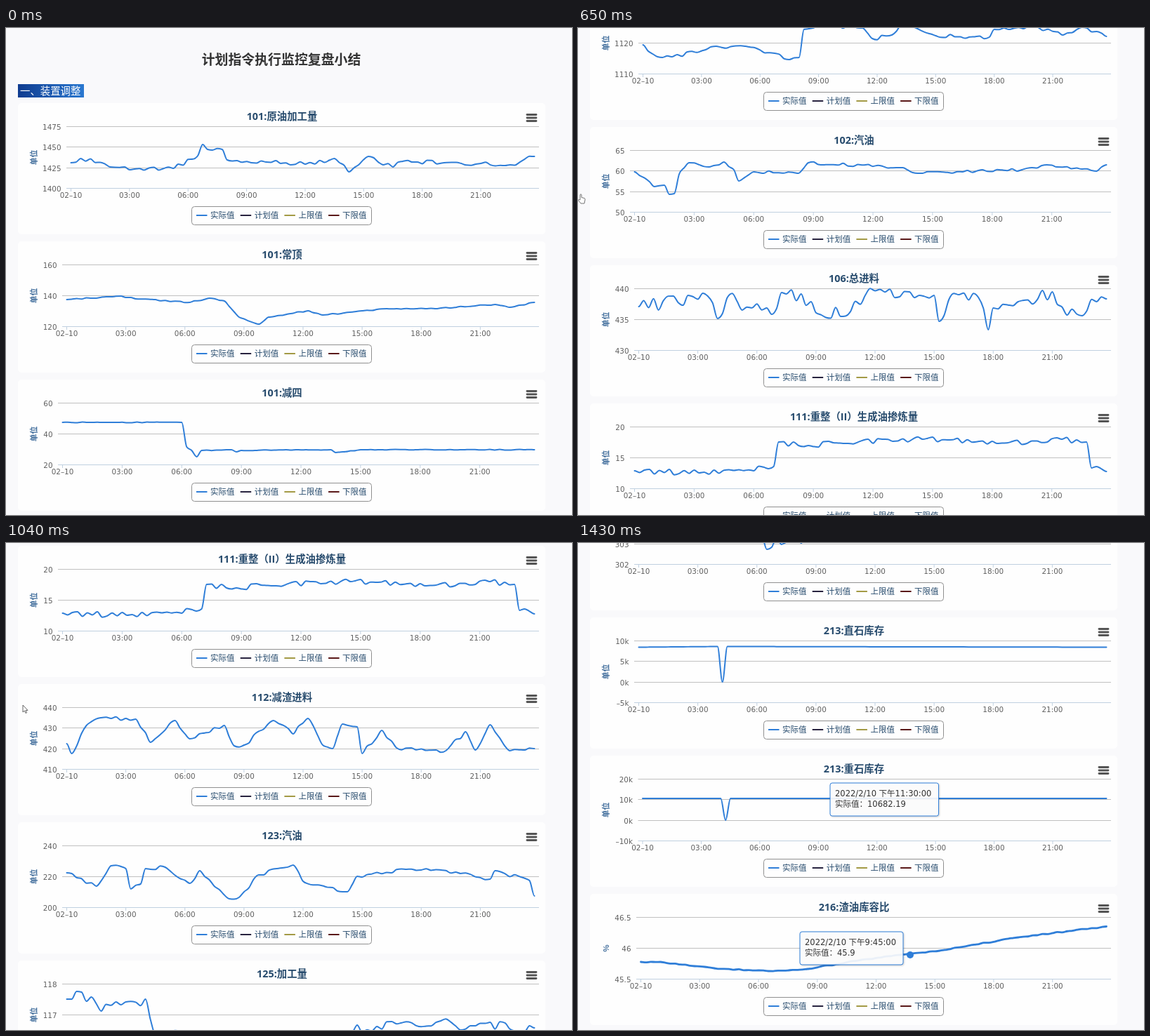
Recreate the animation shown at these times as an HTML page. Size 806x694 px, loop 1560 ms.

```html
<!DOCTYPE html>
<html lang="zh-CN">
<head>
<meta charset="utf-8">
<style>
html, body { margin: 0; width: 100%; height: 100%; overflow: hidden; background: #f9f9fb; }
svg { display: block; width: 806px; height: 694px; }
text { font: 10.4px "DejaVu Sans", "Noto Sans CJK SC", "Noto Sans CJK", sans-serif; fill: #606060; }
.mid { text-anchor: middle; }
.end { text-anchor: end; }
.head { font: bold 18.9px "Noto Sans CJK SC", "Noto Sans CJK", sans-serif; fill: #333; }
.badge { font: 500 14.4px "Noto Sans CJK SC", "Noto Sans CJK", sans-serif; fill: #fff; }
.title { font: bold 14.4px "Open Sans", "Noto Sans CJK SC", "Noto Sans CJK", sans-serif; fill: #274b6d; }
.unit { font: bold 10.8px "Noto Sans CJK SC", "Noto Sans CJK", sans-serif; fill: #3f6c9b; }
.key { font-size: 11.5px; fill: #274b6d; }
.tip text { font-size: 11.5px; fill: #333; }
.tip rect { fill: #fff; fill-opacity: .9; stroke: #2f7ed8; filter: drop-shadow(1px 1px 1px #0003); }
.panel { fill: #fefefe; }
.grid { stroke: #c0c0c0; }
.axis { stroke: #c0d0e0; }
.box { fill: #fefefe; stroke: #909090; }
.line { fill: none; stroke: #2f7ed8; stroke-width: 2; stroke-linejoin: round; stroke-linecap: round; }
.bold { stroke-width: 2.8; }
.menu { stroke: #555; stroke-width: 2.8; stroke-linecap: round; }

#page, #arrow, #hand { animation: scroll 1560ms step-end infinite; }
#arrow { animation-name: arrow; }
#hand { animation-name: hand; }
@keyframes scroll {
  0% { transform: translateY(0); }
  8.333% { transform: translateY(-137px); }
  16.666% { transform: translateY(-273px); }
  24.999% { transform: translateY(-410px); }
  33.333% { transform: translateY(-582px); }
  41.666% { transform: translateY(-754px); }
  49.999% { transform: translateY(-962px); }
  58.333% { transform: translateY(-1169px); }
  66.666% { transform: translateY(-1285px); }
  74.999% { transform: translateY(-1412px); }
  83.333% { transform: translateY(-1538px); }
  91.666%, 100% { transform: translateY(-2365px); }
}
@keyframes arrow {
  0% { transform: translate(4px, 236px); opacity: 0; }
  8.333% { transform: translate(4px, 236px); opacity: 1; }
  41.666% { transform: translate(4px, 236px); opacity: 0; }
  49.999% { transform: translate(24px, 231px); opacity: 1; }
  91.666%, 100% { transform: translate(24px, 231px); opacity: 0; }
}
@keyframes hand {
  0% { opacity: 0; }
  41.666% { opacity: 1; }
  49.999%, 100% { opacity: 0; }
}
</style>
</head>
<body>
<svg viewBox="0 0 806 694">
  <defs>
    <linearGradient id="blue"><stop stop-color="#0f3c90"/><stop offset="1" stop-color="#2a78d0"/></linearGradient>
  </defs>
  <g id="page">
    <text class="head mid" x="392" y="52">计划指令执行监控复盘小结</text>
    <rect x="17" y="80" width="94" height="19" fill="url(#blue)"/>
    <text class="badge" x="20" y="95">一、装置调整</text>
  </g>
  <path id="arrow" d="M0 0V10L2.4 8L4 11.5L5.6 10.8L4 7.4H7Z" fill="#fff" stroke="#555" stroke-width=".9"/>
  <path id="hand" d="M3 244V237.500Q4 236 5 237.500V241.500L9 242.500Q10.500 243 10 245L9 250H4L.5 245.500Q.5 243.500 3 245Z" fill="#fff" stroke="#666" stroke-width=".9"/>
</svg>
<script>
const page = document.getElementById('page');
const RIGHT = 759, LAST = 752.5, PITCH = 197, HEIGHT = 88.5, SLOTS = 96;
const KEYS = [['实际值', '#2f7ed8'], ['计划值', '#28233f'], ['上限值', '#a39a45'], ['下限值', '#5a1818']];
let count = 0;

const text = (cls, x, y, s) => `<text class="${cls}" x="${x}" y="${y}">${s}</text>`;
const rule = (cls, x1, y1, x2, y2) => `<path class="${cls}" d="M${x1} ${y1}L${x2} ${y2}"/>`;

function random(seed) {
  let s = seed * 7919 + 17;
  return () => (s = (s * 16807) % 2147483647) / 2147483647;
}

// Quarter-hour heights: straight runs between slot,height turning points,
// with seeded jitter on the slots in between
function trend(jitter, keys) {
  const rnd = random(count + 1), out = [];
  for (let i = 0, k = 0; i < SLOTS; i++) {
    while (i > keys[k + 2]) k += 2;
    const [x1, y1, x2, y2] = keys.slice(k, k + 4);
    const noise = (rnd() * 2 - 1) * jitter;
    out.push(y1 + (y2 - y1) * (i - x1) / (x2 - x1) + (i === x1 || i === x2 ? 0 : noise));
  }
  return out;
}

// Smooth curve that stays level at peaks and dips
function spline(ys, x0) {
  const dx = (LAST - x0) / (ys.length - 1);
  const slope = ys.map((y, i) => {
    const a = y - ys[i - 1], b = ys[i + 1] - y;
    if (!(a * b > 0)) return 0;
    return Math.sign(a) * Math.min(Math.abs(a + b) / 2, 2 * Math.abs(a), 2 * Math.abs(b));
  });
  let d = `M${x0} ${ys[0]}`;
  for (let i = 1; i < ys.length; i++) {
    const x = x0 + dx * i;
    d += `C${x - dx * 2 / 3} ${ys[i - 1] + slope[i - 1] / 3} ${x - dx / 3} ${ys[i] - slope[i] / 3} ${x} ${ys[i]}`;
  }
  return d;
}

function tip(x, y, w, time, value) {
  return `<g class="tip"><rect x="${x}" y="${y}" width="${w}" height="47" rx="3"/>` +
    text('', x + 7, y + 19, time) + text('', x + 7, y + 34, '实际值：' + value) + '</g>';
}

function chart(title, left, labels, jitter, keys, { unit = '单位', bold = '', extra = '' } = {}) {
  const x0 = left + 6.5, hours = (LAST - x0) / (SLOTS - 1) * 12;
  let s = `<rect class="panel" x="17" y="-33" width="751" height="187" rx="5"/>`;
  s += text('title mid', 393, -9, title);
  for (const y of [-16.5, -12, -7.5]) s += rule('menu', 742, y, 755, y);
  labels.forEach((label, i) => {
    const y = Math.floor(HEIGHT * i / (labels.length - 1)) + .5;
    s += rule(i < labels.length - 1 ? 'grid' : 'axis', left, y, RIGHT, y);
    s += text('end', left - 7.5, y + 4, label);
  });
  for (let i = 0; i < 8; i++) {
    const x = x0 + hours * i;
    s += rule('axis', x, 89, x, 93);
    s += text('mid', x, 102, i ? String(i * 3).padStart(2, 0) + ':00' : '02–10');
  }
  s += `<g transform="translate(44 44.500) rotate(-90)">${text('unit mid', 0, 0, unit)}</g>`;
  s += `<path class="line ${bold}" d="${spline(trend(jitter, keys), x0)}"/>`;
  s += `<rect class="box" x="264.500" y="114.500" width="256" height="26" rx="4"/>`;
  KEYS.forEach(([name, color], i) => {
    const x = 271 + 62.7 * i;
    s += `<path d="M${x} 127h15.500" stroke="${color}" stroke-width="2"/>` + text('key', x + 20, 131, name);
  });
  page.insertAdjacentHTML('beforeend', `<g transform="translate(0 ${140 + PITCH * count++})">${s}${extra}</g>`);
}

chart('101:原油加工量', 86, [1475, 1450, 1425, 1400], 3,
  [0,52, 2,46, 12,62, 21,60, 26,42, 27,26, 28,33, 31,33, 32,48, 48,54, 54,46, 57,65, 61,43, 66,58, 68,50, 90,55, 95,43]);
chart('101:常顶', 80, [160, 140, 120], .8,
  [0,50, 11,45, 14,49, 25,54, 29,48, 32,52, 35,75, 39,85, 41,75, 49,66, 52,72, 65,63, 75,63, 87,57, 90,61, 95,54]);
chart('101:减四', 74, [60, 40, 20], .5,
  [0,28, 24,28, 25,63, 26,68, 27,77, 28,68, 34,67, 35,70, 36,68, 54,67, 55,71, 60,67, 95,67]);
chart('121:原油', 86, [1130, 1120, 1110], 3,
  [0,47, 2,60, 6,64, 15,49, 21,49, 27,59, 30,68, 32,65, 33,25, 37,18, 45,23, 47,38, 51,33, 53,18, 60,34, 71,36, 72,25, 81,22, 86,33, 90,22, 95,35]);
chart('102:汽油', 74, [65, 60, 55, 50], 2,
  [0,31, 4,52, 6,50, 7,63, 8,62, 9,34, 11,18, 15,24, 18,17, 20,28, 21,44, 24,31, 33,33, 35,18, 54,25, 57,33, 78,28, 82,22, 93,30, 95,21]);
chart('106:总进料', 80, [440, 435, 430], 10,
  [0,26, 14,11, 16,43, 18,13, 27,37, 29,6, 41,40, 46,10, 60,10, 61,47, 63,16, 69,13, 71,59, 72,28, 84,5, 87,38, 95,15]);
chart('111:重整（II）生成油掺炼量', 74, [20, 15, 10], 4,
  [0,63, 13,66, 28,57, 29,22, 33,27, 58,18, 73,24, 86,18, 91,22, 92,59, 95,64]);
chart('112:减渣进料', 80, [440, 430, 420, 410], 3,
  [0,52, 1,66, 4,26, 7,15, 14,17, 17,50, 22,19, 25,45, 32,26, 34,55, 36,54, 42,19, 46,38, 49,16, 52,54, 54,59, 56,24, 59,28, 60,66, 64,33, 67,58, 77,62, 81,35, 83,61, 86,25, 90,62, 95,59]);
chart('123:汽油', 80, [240, 220, 200], 2.5,
  [0,39, 6,58, 9,29, 12,33, 13,62, 15,55, 16,33, 20,31, 25,54, 27,36, 33,76, 35,74, 39,42, 46,28, 48,51, 57,66, 59,44, 69,34, 76,35, 86,48, 87,36, 94,50, 95,72]);
chart('125:加工量', 80, [118, 117, 116], 8,
  [0,22, 3,12, 7,39, 16,22, 18,72, 34,78, 49,81, 66,54, 82,60, 95,63]);
chart('130:加工量', 80, [272, 270, 268], 6,
  [0,74, 2,48, 7,44, 17,68, 32,66, 40,36, 47,43, 49,61, 74,47, 81,75, 83,51, 95,60]);
chart('', 80, [305, 304, 303, 302], 0,
  [0,40, 25,48, 26,67, 27,64, 28,50, 29,60, 32,50, 33,58, 34,50, 95,40]);
chart('213:直石库存', 80, ['10k', '5k', '0k', '–5k'], 0,
  [0,9.5, 16,8.5, 17,59, 18,8.5, 95,9.5]);
chart('213:重石库存', 85.5, ['20k', '10k', '0k', '–10k'], 0,
  [0,28, 16,28, 17,59, 18,28, 95,28],
  { extra: tip(359, 6, 154.5, '2022/2/10 下午11:30:00', '10682.19') });
chart('216:渣油库容比', 83, ['46.5', '46', '45.5'], .7,
  [0,64, 4,64, 15,73, 26,77, 34,74, 45,61, 53,54, 61,48, 77,29, 95,13.5],
  { unit: '%', bold: 'bold', extra: '<circle cx="473" cy="54" r="5" fill="#2f7ed8"/>' +
    tip(316, 21, 147, '2022/2/10 下午9:45:00', '45.9') });
</script>
</body>
</html>
```
